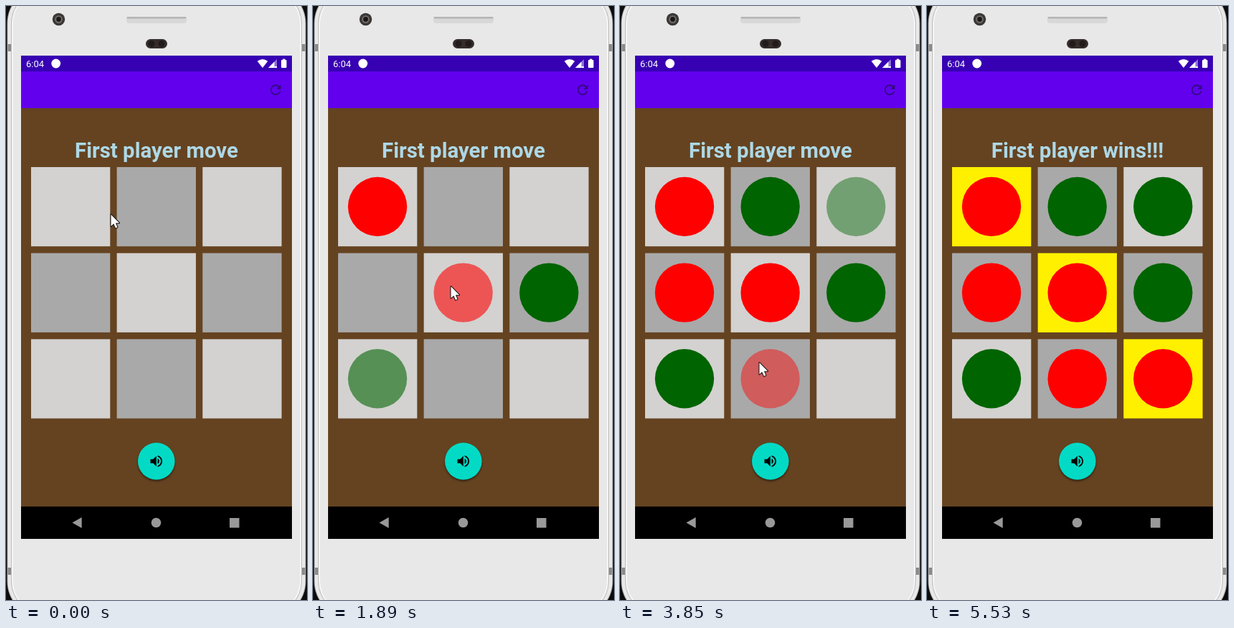
An HTML page with a canvas for the animation above (6.02 s loop, 420x826 px).

```html
<!DOCTYPE html>
<html lang="en">
<head>
<meta charset="utf-8">
<title>Three in a row</title>
<style>
html, body { margin: 0; width: 100%; height: 100%; overflow: hidden; background: #0c0c0c; }
canvas { display: block; width: 420px; height: 826px; }
</style>
</head>
<body>
<canvas id="stage"></canvas>
<script>
const LOOP = 6020, STEP = 70, FADE = 1000, WIN = 4480;
const W = 420, H = 826;
const RED = '#ff0000', GREEN = '#006400';

const canvas = document.getElementById('stage');
const dpr = window.devicePixelRatio || 1;
canvas.width = W * dpr;
canvas.height = H * dpr;
const ctx = canvas.getContext('2d');
ctx.scale(dpr, dpr);

// [column, row, colour, fade start]
const moves = [
  [0, 0, RED, 350], [2, 1, GREEN, 350],
  [1, 1, RED, 1330], [0, 2, GREEN, 1330],
  [0, 1, RED, 2520], [1, 0, GREEN, 2520],
  [1, 2, RED, 3380], [2, 0, GREEN, 3380],
  [2, 2, RED, 4430]
];

// Pointer stops: [time, x, y]
const stops = [
  [0, 146, 290], [210, 118, 287], [770, 118, 287], [1120, 185, 375],
  [1330, 192, 390], [2030, 192, 390], [2310, 139, 382], [3080, 139, 382],
  [3220, 164, 419], [3290, 187, 479], [3430, 194, 496], [3920, 194, 496],
  [4340, 347, 516], [5180, 347, 516], [5460, 334, 8], [5530, 330, -40]
];

const icons = {
  sound: new Path2D('M3 9v6h4l5 5V4L7 9H3zm13.5 3c0-1.77-1.02-3.29-2.5-4.03v8.05c1.48-.73 2.5-2.25 2.5-4.02zM14 3.23v2.06c2.89.86 5 3.54 5 6.71s-2.11 5.85-5 6.71v2.06c4.01-.91 7-4.49 7-8.77s-2.99-7.86-7-8.77z'),
  refresh: new Path2D('M17.65 6.35C16.2 4.9 14.21 4 12 4c-4.42 0-7.99 3.58-7.99 8s3.57 8 7.99 8c3.73 0 6.84-2.55 7.73-6h-2.08c-.82 2.33-3.04 4-5.65 4-3.31 0-6-2.69-6-6s2.69-6 6-6c1.66 0 3.14.69 4.22 1.78L13 11h7V4l-2.35 2.35z'),
  pointer: new Path2D('M0 0V16.2L3.8 12.8L6.4 18.8L9 17.7L6.5 11.8H11.6Z')
};

function rect(x, y, w, h, fill) {
  ctx.fillStyle = fill;
  ctx.fillRect(x, y, w, h);
}

function round(x, y, w, h, r, fill) {
  ctx.fillStyle = fill;
  ctx.beginPath();
  ctx.roundRect(x, y, w, h, r);
  ctx.fill();
}

function disc(x, y, r, fill) {
  ctx.fillStyle = fill;
  ctx.beginPath();
  ctx.arc(x, y, r, 0, Math.PI * 2);
  ctx.fill();
}

function poly(fill, ...pts) {
  ctx.fillStyle = fill;
  ctx.beginPath();
  pts.forEach(([x, y]) => ctx.lineTo(x, y));
  ctx.fill();
}

function icon(path, cx, cy, size, fill) {
  ctx.save();
  ctx.translate(cx - size / 2, cy - size / 2);
  ctx.scale(size / 24, size / 24);
  ctx.fillStyle = fill;
  ctx.fill(path);
  ctx.restore();
}

function text(str, x, y, font, fill, align) {
  ctx.font = font + ' Roboto, sans-serif';
  ctx.textAlign = align;
  ctx.fillStyle = fill;
  ctx.fillText(str, x, y);
}

function drawPhone() {
  rect(0, 0, W, H, '#0c0c0c');
  round(1.5, -26, 417, 876, 50, '#a9a9a9');
  round(2.5, -25, 415, 874, 49, '#e9e9e9');
  for (const y of [53, 781]) {
    rect(2.5, y, 5, 10, '#8b8b8b');
    rect(412.5, y, 5, 10, '#8b8b8b');
  }
  round(7, -21, 406, 866, 45, '#bdbdbd');
  round(8, -20, 404, 864, 44, '#f6f6f6');
  round(10, -18, 400, 860, 42, '#e8e8e8');

  disc(73.5, 18.5, 8.7, '#3b3836');
  disc(73.5, 18.5, 5.2, '#77716d');
  disc(73.5, 18.5, 3.4, '#1b1918');
  round(168, 15, 84, 9, 4, '#d8d8d8');
  round(168.5, 15, 83, 2.5, 1.2, '#b5b5b5');
  round(195, 46, 30, 13, 6.5, '#352d2b');
  disc(203, 52.5, 4.6, '#211c1b');
  disc(217, 52.5, 4.6, '#211c1b');
}

function drawStatus() {
  text('6:04', 28, 84.7, '13px', '#fff', 'left');
  disc(69.7, 80, 6.4, '#fff');

  ctx.fillStyle = '#fff';
  ctx.beginPath();
  ctx.moveTo(358, 86);
  ctx.lineTo(350.7, 76.8);
  ctx.quadraticCurveTo(358, 71.4, 365.3, 76.8);
  ctx.fill();

  poly('#8e74d6', [378, 74], [378, 86], [366, 86]);
  poly('#fff', [374.5, 77.5], [374.5, 86], [366, 86]);
  rect(374.5, 84, 3.5, 2, '#fff');
  round(384, 75, 7.5, 11, 1, '#fff');
  rect(386, 73.6, 3.5, 2, '#fff');
}

function drawScreen(won) {
  rect(21, 69, 378, 672, '#654321');
  rect(21, 69, 378, 22, '#3700b3');
  rect(21, 91, 378, 51, '#6200ee');
  rect(21, 696, 378, 45, '#000');
  drawStatus();
  icon(icons.refresh, 376.3, 116.7, 22, '#330a80');
  text(won ? 'First player wins!!!' : 'First player move', 210, 211, 'bold 29.4px', '#add8e6', 'center');

  ctx.save();
  ctx.shadowColor = 'rgba(0,0,0,.5)';
  ctx.shadowBlur = 3 * dpr;
  ctx.shadowOffsetY = 2 * dpr;
  disc(209.8, 633, 25.8, '#03dac5');
  ctx.restore();
  icon(icons.sound, 209.8, 633, 22, '#000');

  poly('#999', [92.5, 718.5], [105.7, 711], [105.7, 726]);
  disc(209.5, 718.5, 6.8, '#999');
  rect(312, 712, 13.5, 13.5, '#999');
}

function drawBoard(t, won) {
  for (let i = 0; i < 9; i++) {
    const col = i % 3, row = Math.floor(i / 3);
    const plain = i % 2 ? '#a9a9a9' : '#d3d2d0';
    rect(35 + col * 119.65, 224 + row * 119.65, 110.3, 110.2, won && col === row ? '#fff000' : plain);
  }
  for (const [col, row, fill, start] of moves) {
    const p = Math.min(1, Math.max(0, (t - start) / FADE));
    ctx.globalAlpha = 0.5 - 0.5 * Math.cos(Math.PI * p);
    disc(90 + col * 119.65, 279 + row * 119.65, 41.2, fill);
  }
  ctx.globalAlpha = 1;
}

function drawPointer(t) {
  const next = stops.findIndex(s => s[0] > t);
  if (next < 0) return;
  const [t0, x0, y0] = stops[next - 1];
  const [t1, x1, y1] = stops[next];
  const p = (t - t0) / (t1 - t0);
  ctx.save();
  ctx.translate(x0 + (x1 - x0) * p + 0.5, y0 + (y1 - y0) * p);
  ctx.lineWidth = 2;
  ctx.lineJoin = 'round';
  ctx.strokeStyle = '#111';
  ctx.stroke(icons.pointer);
  ctx.fillStyle = '#fff';
  ctx.fill(icons.pointer);
  ctx.restore();
}

function frame(now) {
  const t = Math.floor((now % LOOP) / STEP) * STEP;
  const won = t >= WIN;
  drawPhone();
  drawScreen(won);
  drawBoard(t, won);
  drawPointer(t);
  requestAnimationFrame(frame);
}
requestAnimationFrame(frame);
</script>
</body>
</html>
```
